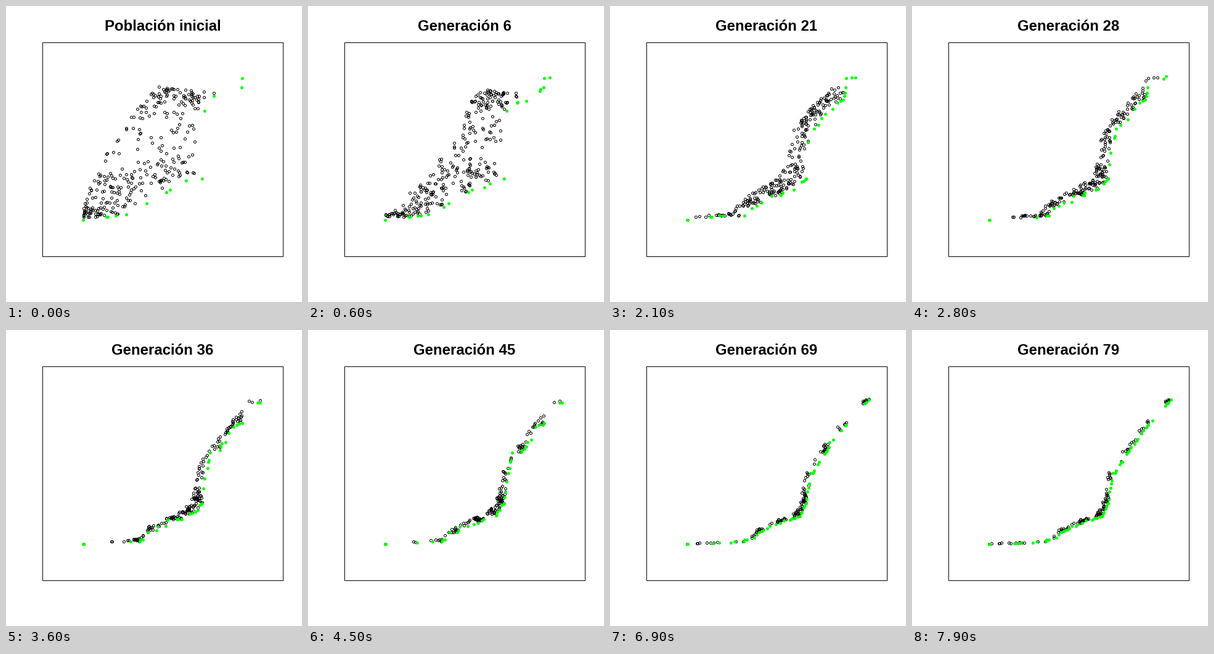
Animation of 480x480 px, one loop 8000 ms. Source, as a matplotlib script:

```python
import numpy as np
import matplotlib.pyplot as plt
from matplotlib.animation import FuncAnimation
from matplotlib.patches import Rectangle

SIZE, DPI = 480, 96
PX = 72 / DPI
GENS = 80
GREEN = "#00ff00"
rng = np.random.default_rng(12)

# Key points of the first and last front, and of the first cloud's far edge
FIRST = np.array([(125, 347), (195, 338), (228, 320), (266, 298), (292, 283),
                  (318, 280), (322, 170), (337, 146), (382, 132), (383, 117)])
LAST = np.array([(125, 347), (229, 344), (248, 326), (284, 311), (309, 302),
                 (318, 280), (324, 243), (350, 201), (376, 163), (422, 112)])
EDGE = np.array([(125, 338), (126, 322), (138, 282), (143, 272), (168, 230),
                 (195, 190), (222, 152), (247, 131), (247, 131), (247, 131)])
NODES = np.arange(len(FIRST))
END = NODES[-1]


def along(nodes, u):
    return np.column_stack([np.interp(u, NODES, axis) for axis in nodes.T])


def front_at(gen):
    return FIRST + (LAST - FIRST) * (1 - np.exp(-gen / 19))


def depth(gen):
    """Share of the way to the far edge that the cloud still fills."""
    return 0.05 + 0.95 * np.exp(-gen / 13)


def clump(u, amount):
    """Draw the parameters together around the nodes."""
    return u - amount * np.sin(2 * np.pi * u) / (2 * np.pi)


def sample_cloud(gen, count):
    reach = np.interp(gen, [0, 25], [7.3, END])
    u = clump(rng.uniform(0, reach, max(count, 0)),
              np.interp(gen, [0, 40], [0, 0.85]))
    v = depth(gen) * rng.uniform(0.1, 1, (len(u), 1))
    front, edge = along(front_at(gen), u), along(EDGE, u)
    return np.round(front + (edge - front) * v)


def sample_finds(gen, count):
    u = clump(END * rng.random(count) ** 0.75, np.interp(gen, [0, 60], [0.85, 0.3]))
    return np.round(along(front_at(gen), u))


def beaten(pts, rivals, strict=False):
    """True where some rival lies further right and further down."""
    gx, gy = rivals.T
    x, y = pts[:, :1], pts[:, 1:]
    lower = gy > y if strict else gy >= y
    return ((gx >= x) & lower).any(axis=1)


def outside(pts, gen):
    u = np.linspace(0, END, 200)
    front, edge = along(front_at(gen), u), along(EDGE, u)
    return beaten(pts, front + (edge - front) * depth(gen) - 2)


def evolve():
    early = np.round(along(FIRST, rng.uniform(0, 3, 4)))
    archive = np.vstack([FIRST, early])
    seen = np.full(len(archive), -99)
    cloud, history = sample_cloud(0, 310), []
    for gen in range(GENS):
        if gen:
            archive = np.vstack([archive, sample_finds(gen, 2)])
            seen = np.append(seen, [-99, -99])
            survive = np.interp(gen, [0, 36], [0.8, 0.95])
            cloud = cloud[rng.random(len(cloud)) < survive]
            cloud = cloud[~outside(cloud, gen)]
            size = int(130 + 170 * np.exp(-(gen / 32) ** 2))
            cloud = np.vstack([cloud, sample_cloud(gen, size - len(cloud))])
        best = ~beaten(archive, archive, strict=True)
        seen[best] = gen
        cloud = cloud[beaten(cloud, archive[best])]
        retired = archive[~best & (gen - seen < 8)]
        history.append((np.vstack([cloud, retired]), archive[best]))
    return history


history = evolve()

fig = plt.figure(figsize=(SIZE / DPI, SIZE / DPI), dpi=DPI, facecolor="white")
ax = fig.add_axes([0, 0, 1, 1])
ax.set(xlim=(0, SIZE), ylim=(SIZE, 0))
ax.axis("off")
ax.add_patch(Rectangle((59.1, 59.1), 390, 347, fill=False, ec="black", lw=PX))
title = ax.text(254, 39.5, "", ha="center", va="baseline", color="black",
                family="Liberation Sans", weight="bold", size=24 * PX)
rest, = ax.plot([], [], "o", ms=4 * PX, mfc="none", mec="black", mew=PX)
front, = ax.plot([], [], "o", ms=5 * PX, color=GREEN, mew=0)


def draw(gen):
    title.set_text(f"Generación {gen}" if gen else "Población inicial")
    for line, pts in zip((rest, front), history[gen]):
        line.set_data(*(pts + 0.1).T)
    return title, rest, front


anim = FuncAnimation(fig, draw, frames=GENS, interval=100, repeat=True)
plt.show()
```
